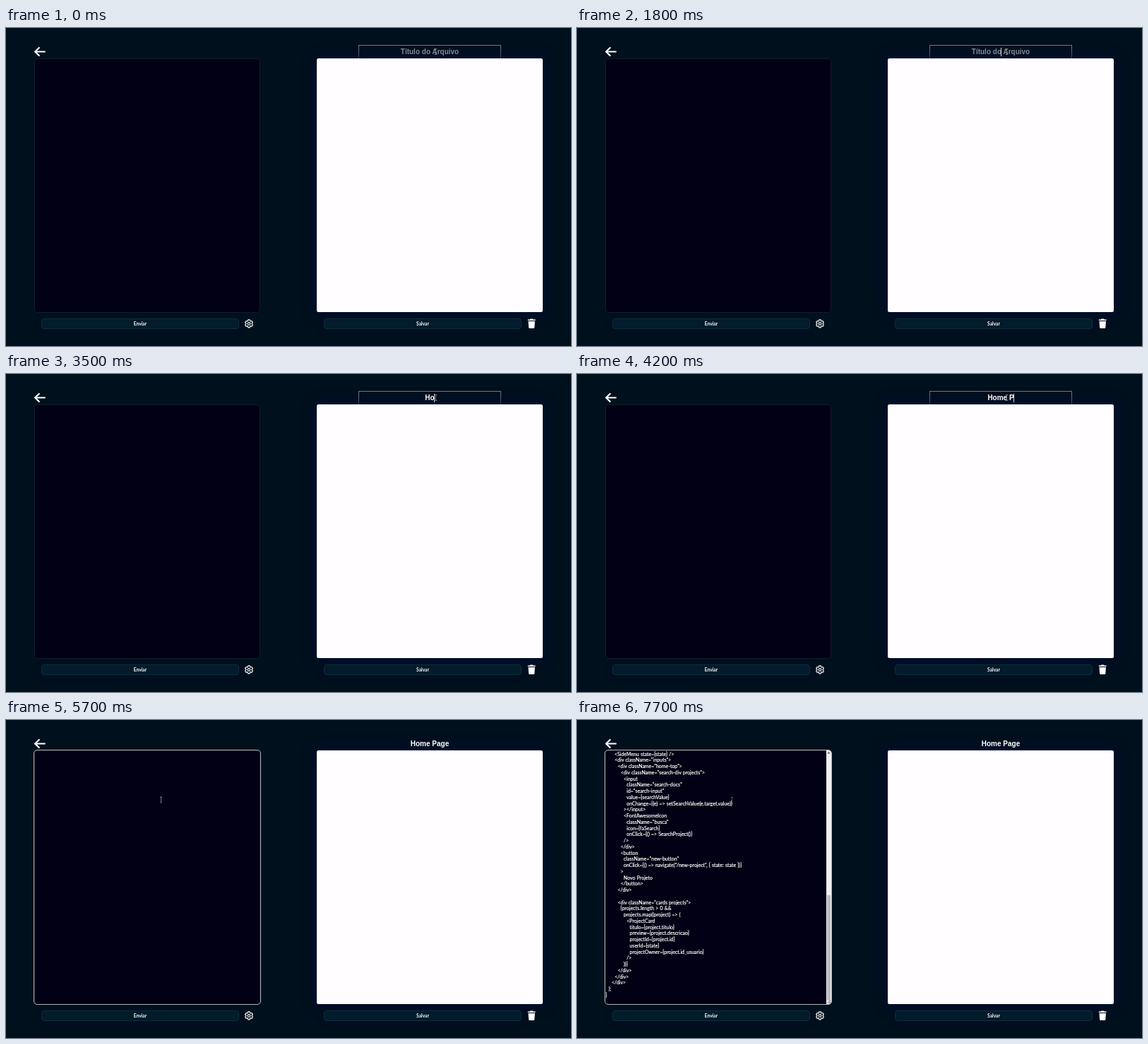
An HTML page for the animation above (8000 ms loop, 800x450 px).

```html
<!DOCTYPE html>
<html lang="pt">
<head>
<meta charset="utf-8">
<title>Editor</title>
<style>
  html, body { margin: 0; width: 100%; height: 100%; overflow: hidden; background: #00101d; }
  #stage { position: relative; width: 800px; height: 450px; overflow: hidden; color: #fff; }
  #stage * { position: absolute; box-sizing: border-box; }

  .pane { border-radius: 4.5px; }
  #input { left: 40px; top: 42.5px; width: 320px; height: 360px; background: #020014; border: 1px solid #111c2c; }
  #focus { left: 39px; top: 42px; width: 322px; height: 361px; border: 1px solid #b4b3b8; border-radius: 5px;
    visibility: hidden; animation: focus 8s infinite step-end; }
  #output { left: 440.4px; top: 42.8px; width: 319.2px; height: 359.4px; border-radius: 2.5px;
    background: #fffdff; box-shadow: 0 0 18px 2px #020c34; }

  .button { top: 410.5px; width: 280px; height: 15px; border: 1px solid #08303f; border-radius: 4px;
    background: #031b2b; box-shadow: 0 2px 9px #020d28;
    font: 700 6.6px/13px Lato, sans-serif; text-align: center; }

  #title { left: 499px; top: 23.5px; width: 202px; height: 24px; border: 1px solid #77777b; border-top-color: #8b7468;
    animation: blur 8s infinite step-end; }
  #name { left: 500px; top: 27px; width: 200px; font: 700 10px/13px "Liberation Sans", Arial, sans-serif;
    text-align: center; white-space: pre; }
  #name.empty { color: #85888f; }
  #caret { top: 28px; width: 1px; height: 12px; background: #d5d8dc; }

  #beam { left: 606px; top: 28.5px; width: 5px; height: 9px; mix-blend-mode: difference; opacity: .48;
    animation: point 8s infinite step-end; }

  #paste { left: 0; top: 0; width: 800px; height: 450px; visibility: hidden; animation: paste 8s infinite step-end; }
  #code { left: 40.5px; top: 43.7px; margin: 0; font: 7px/8.75px Lato, sans-serif; word-spacing: .33px;
    font-variant-ligatures: none; color: #fff; -webkit-text-stroke: .2px #fff; }
  #track { left: 353px; top: 43px; width: 6.5px; height: 359px; background: #f1f0f1; border-radius: 0 4px 4px 0; }
  #thumb { left: .6px; top: 205px; width: 5.4px; height: 149px; background: #bdbcbe; }
  svg { left: 0; top: 0; }

  @keyframes focus { 0% { visibility: hidden; } 67.5%, 100% { visibility: visible; } }
  @keyframes blur { 0% { visibility: visible; } 67.5%, 100% { visibility: hidden; } }
  @keyframes paste { 0% { visibility: hidden; } 78.75%, 100% { visibility: visible; } }
  @keyframes point {
    0% { transform: none; }
    65% { transform: translate(-389px, 79.5px); }
    78.75% { transform: translate(-389px, 79.5px); opacity: .3; }
    85%, 100% { transform: translate(-389px, 80px); opacity: .3; }
  }
</style>
</head>
<body>
<div id="stage">
  <div id="title"></div>
  <div class="pane" id="input"></div>
  <div class="pane" id="output"></div>
  <div class="button" style="left:50px">Enviar</div>
  <div class="button" style="left:450px">Salvar</div>
  <div id="name"></div>
  <div id="caret"></div>

  <div id="paste">
<pre id="code">
      &lt;SideMenu state={state} /&gt;
      &lt;div className="inputs"&gt;
        &lt;div className="home-top"&gt;
          &lt;div className="search-div projects"&gt;
            &lt;input
              className="search-docs"
              id="search-input"
              value={searchValue}
              onChange={(e) =&gt; setSearchValue(e.target.value)}
            &gt;&lt;/input&gt;
            &lt;FontAwesomeIcon
              className="busca"
              icon={faSearch}
              onClick={() =&gt; SearchProject()}
            /&gt;
          &lt;/div&gt;
          &lt;button
            className="new-button"
            onClick={() =&gt; navigate("/new-project", { state: state })}
          &gt;
            Novo Projeto
          &lt;/button&gt;
        &lt;/div&gt;

        &lt;div className="cards projects"&gt;
          {projects.length &gt; 0 &amp;&amp;
            projects.map((project) =&gt; (
              &lt;ProjectCard
                titulo={project.titulo}
                preview={project.descricao}
                projectId={project.id}
                userId={state}
                projectOwner={project.id_usuario}
              /&gt;
            ))}
        &lt;/div&gt;
      &lt;/div&gt;
    &lt;/div&gt;
  );
}</pre>
    <div id="track"><div id="thumb"></div></div>
    <svg width="800" height="450">
      <path d="M354.5 47.5l2-2.5 2 2.5z" fill="#555"/>
      <path d="M354.5 401l4.5-4.5M357 401l2-2" stroke="#333" stroke-width=".8"/>
    </svg>
  </div>
  <div id="focus"></div>

  <svg width="800" height="450" fill="none" stroke="#fff">
    <path d="M54.9 33.5H41.3M46.8 28l-5.7 5.5 5.7 5.5" stroke-width="2.2" stroke-linecap="round" stroke-linejoin="round"/>
    <g transform="translate(344 418.4) scale(.55) translate(-12 -12)" stroke-width="2.1">
      <circle cx="12" cy="12" r="3.2"/>
      <path d="M19.43 12.98c.04-.32.07-.64.07-.98 0-.34-.03-.66-.07-.98l2.11-1.65c.19-.15.24-.42.12-.64l-2-3.46c-.09-.16-.26-.25-.44-.25-.06 0-.12.01-.17.03l-2.49 1c-.52-.4-1.08-.73-1.69-.98l-.38-2.65C14.46 2.18 14.25 2 14 2h-4c-.25 0-.46.18-.49.42l-.38 2.65c-.61.25-1.17.59-1.69.98l-2.49-1c-.06-.02-.12-.03-.18-.03-.17 0-.34.09-.43.25l-2 3.46c-.13.22-.07.49.12.64l2.11 1.65c-.04.32-.07.65-.07.98 0 .33.03.66.07.98l-2.11 1.65c-.19.15-.24.42-.12.64l2 3.46c.09.16.26.25.44.25.06 0 .12-.01.17-.03l2.49-1c.52.4 1.08.73 1.69.98l.38 2.65c.03.24.24.42.49.42h4c.25 0 .46-.18.49-.42l.38-2.65c.61-.25 1.17-.59 1.69-.98l2.49 1c.06.02.12.03.18.03.17 0 .34-.09.43-.25l2-3.46c.12-.22.07-.49-.12-.64z"/>
    </g>
    <path d="M738.8 412.4h3l.7-1h3.4l.7 1h3v1.6h-10.8zM739.5 415h9.4l-.6 8.8q-.1 1.2-1.3 1.2h-5.6q-1.2 0-1.3-1.2z" fill="#fff" stroke="none"/>
  </svg>

  <svg id="beam" viewBox="0 0 5 9" fill="none" stroke="#fff"><path d="M.8 .5h3.4M2.5 .5v8M.8 8.5h3.4"/></svg>
</div>
<script>
  const label = document.getElementById("name");
  const caret = document.getElementById("caret");
  const text = "Home Page";
  const keys = [2800, 3200, 3600, 3700, 3900, 4100, 4300, 4500, 4700];
  const blinks = [[300, 800], [1300, 1850], [2300, 5200]];
  const start = performance.now();
  let shown = -1;

  function frame() {
    const t = Math.max(0, performance.now() - start) % 8000;
    const typed = keys.filter(k => t >= k).length;
    if (typed !== shown) {
      shown = typed;
      label.textContent = text.slice(0, typed) || "Título do Arquivo";
      label.className = typed ? "" : "empty";
      const range = document.createRange();
      range.selectNodeContents(label);
      caret.style.left = (typed ? Math.floor(range.getBoundingClientRect().right) : 600) + "px";
    }
    const on = blinks.some(([from, to]) => t >= from && t < to);
    caret.style.visibility = on ? "visible" : "hidden";
    requestAnimationFrame(frame);
  }
  frame();
</script>
</body>
</html>
```
